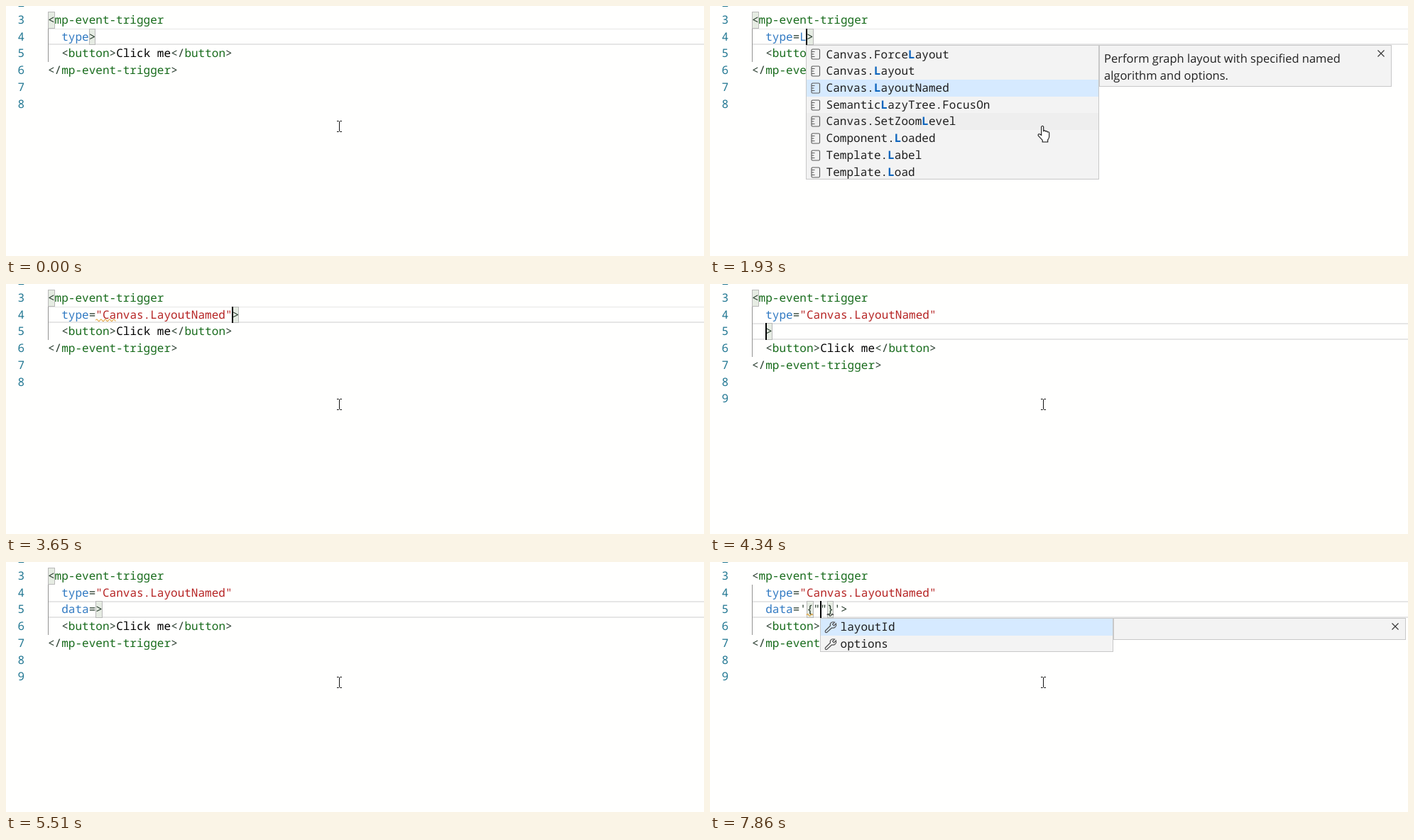
An HTML page with a canvas for the animation above (8000 ms loop, 983 by 353 pixels).

```html
<!DOCTYPE html>
<html lang="en">
<head>
<meta charset="utf-8">
<title>Editor completion</title>
<style>
  html, body { margin: 0; height: 100%; overflow: hidden; background: #fffffe; }
  canvas { display: block; }
</style>
</head>
<body>
<canvas width="983" height="353"></canvas>
<script>
const ctx = document.querySelector('canvas').getContext('2d');
const LOOP = 8000, LEFT = 59, TOP = 8, CELL = 9.62, ROW = 23.73, MENU_W = 413, HELP_W = 412;
const MONO = '16.03px "Noto Sans Mono", monospace';
const SANS = '16.5px "Open Sans", sans-serif';
const DARK = '#263a2b', GREEN = '#176b1b', BLUE = '#3079c2', RED = '#b52222', ORANGE = '#e0a23c';

const colX = col => LEFT + col * CELL;
const rowY = row => TOP + row * ROW;
const baseline = row => Math.round(rowY(row) + 16.95);

const layoutHelp = ['Perform graph layout with specified named', 'algorithm and options.'];
const layouts = ['Canvas.ForceLayout', 'Canvas.Layout', 'Canvas.LayoutNamed', 'SemanticLazyTree.FocusOn'];
const typeMenu = (query, items, selected = 2) =>
  ({ query, items, selected, icon: ruler, help: layoutHelp, helpH: 59 });
const dataMenu = query =>
  ({ query, items: ['data'], selected: 0, icon: field, help: ['Data that will be sent to all targets.'], helpH: 35 });

const allTypes = typeMenu('', [
  'Canvas.LayoutNamed', 'Canvas.Print', 'Canvas.SetZoomLevel', 'Canvas.ZoomBy', 'Canvas.ZoomIn',
  'Canvas.ZoomOut', 'Canvas.ZoomToFit', 'Component.Loaded', 'Component.Refresh',
  'Component.TemplateUpdate', 'Components.SetManagement.ItemAdded', 'Components.SetManagement.ItemRemov…'], 0);
const keyMenu = { query: '', items: ['layoutId', 'options'], selected: 0, icon: wrench, help: [], helpH: 31 };

// Each step overrides part of the state; "|" marks the caret.
const steps = [
  [0, { code: '  type|>', caret: false, menu: null, hand: false, waves: [], done: '', braces: false }],
  [460, { caret: true }],
  [930, { code: '  type=|>', menu: allTypes, hand: true }],
  [1390, { caret: false }],
  [1930, { code: '  type=L|>', caret: true, menu: typeMenu('L',
    [...layouts, 'Canvas.SetZoomLevel', 'Component.Loaded', 'Template.Label', 'Template.Load']) }],
  [2090, { code: '  type=La|>', menu: typeMenu('La', [...layouts, 'Template.Label']) }],
  [2300, { code: '  type=Lay|>', menu: typeMenu('Lay', layouts), hand: false }],
  [2850, { caret: false, waves: [[7, 3, ORANGE]] }],
  [3340, { caret: true }],
  [3650, { code: '  type="Canvas.LayoutNamed"|>', menu: null }],
  [4110, { caret: false }],
  [4190, { waves: [] }],
  [4340, { done: '  type="Canvas.LayoutNamed"', code: '  |>', caret: true }],
  [4650, { code: '  d|>' }],
  [4730, { menu: dataMenu('d') }],
  [4880, { code: '  da|>', menu: dataMenu('da') }],
  [4960, { code: '  dat|>', menu: dataMenu('dat') }],
  [5110, { code: '  data|>', menu: dataMenu('data') }],
  [5510, { code: '  data=|>', caret: false, menu: null }],
  [5910, { code: "  data='|'>", caret: true }],
  [6440, { caret: false, waves: [[7, 2, ORANGE]] }],
  [6670, { code: "  data='{|'>", caret: true }],
  [6920, { code: "  data='{|}'>", braces: true, waves: [] }],
  [7470, { caret: false, waves: [[8, 2, ORANGE]] }],
  [7620, { code: `  data='{"|"}'>`, caret: true, waves: [[8, 1, ORANGE], [11, 1, '#333']] }],
  [7710, { caret: false, menu: keyMenu }],
  [7860, { caret: true }],
];

function text(str, x, y, color, font = MONO) {
  ctx.font = font;
  ctx.fillStyle = color;
  ctx.fillText(str, x, y);
}

// Fills between whole pixels so that edges stay sharp.
function rect(x, y, w, h, fill, stroke) {
  const left = Math.round(x), top = Math.round(y);
  const width = Math.round(x + w) - left, height = Math.round(y + h) - top;
  ctx.fillStyle = fill;
  ctx.fillRect(left, top, width, height);
  if (!stroke) return;
  ctx.strokeStyle = stroke;
  ctx.lineWidth = 1;
  ctx.strokeRect(left + .5, top + .5, width - 1, height - 1);
}

function path(d, stroke, width = 1.2, fill) {
  const p = new Path2D(d);
  if (fill) { ctx.fillStyle = fill; ctx.fill(p); }
  ctx.strokeStyle = stroke;
  ctx.lineWidth = width;
  ctx.stroke(p);
}

function at(x, y, draw) {
  ctx.save();
  ctx.translate(x, y);
  draw();
  ctx.restore();
}

function ruler() {
  path('M3 -7H11.5Q13 -7 13 -5.5V5.5Q13 7 11.5 7H3Q1.5 7 1.5 5.5V-5.5Q1.5 -7 3 -7ZM2 -3.5H6M2 0H5M2 3.5H6', '#5a5a5a', 1.1);
}

function field() {
  path('M7.5 -2V-5.5H16.5V.5H12', '#bf6d13', 1.3);
  path('M.5 -.5H9.5V6.5H.5ZM3 2H7M3 4H7M10 -3H14', '#bf6d13', 1.3);
}

function wrench() {
  path('M1 5L8 -2C7 -6 10 -8 14 -7L11 -4L13 -2L16 -5C17 -1 14 2 10 1L3 7.5Q0 8 1 5Z', '#505050');
}

function drawCode(line, row) {
  let col = 0, previous = '';
  for (const token of line.match(/<\/?|>|"[^"]*"|'[^']*'|=|[^<>="']+/g) || []) {
    const color = /^[<>='{]/.test(token) ? DARK
      : token[0] === '"' ? RED
      : previous[0] === '<' ? GREEN
      : previous === '>' ? '#000' : BLUE;
    text(token, colX(col), baseline(row), color);
    col += token.length;
    previous = token;
  }
}

function bracketBox(col, row) {
  rect(colX(col), rowY(row), CELL, ROW, '#e6ece3', '#b9b9b9');
}

function wave(col, length, row, color) {
  const x = colX(col), y = rowY(row) + 19.5;
  let d = `M${x} ${y}`;
  for (let i = 1; i <= length * CELL; i++) d += `L${x + i} ${y - 1.5 * Math.sin(i * Math.PI / 3)}`;
  path(d, color, 1.1);
}

function drawMenu(menu, x, y, hover) {
  const right = x + MENU_W;
  if (menu.help) {
    rect(right, y, HELP_W, menu.helpH, '#f3f3f3', '#c8c8c8');
    menu.help.forEach((line, i) => text(line, right + 7, Math.round(y) + 25 + i * 23.5, '#222', SANS));
    at(right + HELP_W - 15, Math.round(y) + 12, () => path('M-4.5 -4.5L4.5 4.5M4.5 -4.5L-4.5 4.5', '#333', 1.1));
  }
  const height = menu.items.length * ROW;
  rect(x, y, MENU_W, height, '#f3f3f3', '#c8c8c8');
  menu.items.forEach((item, i) => {
    const top = y + 1 + i * ROW, rowH = Math.min(ROW, y + height - 1 - top);
    if (i === menu.selected) rect(x + 1, top, MENU_W - 2, rowH, '#d6eaff');
    else if (hover && i === 4) rect(x + 1, top, MENU_W - 2, rowH, '#eeeeee');
    at(x + 6.5, Math.round(top + 12), menu.icon);
    let matched = 0;
    [...item].forEach((ch, k) => {
      const hit = ch === menu.query[matched];
      if (hit) matched++;
      text(ch, x + 28.6 + k * CELL, Math.round(top + 17.1), hit ? '#0f66bd' : '#1e1e1e', (hit ? 'bold ' : '') + MONO);
    });
  });
}

function drawPointer(hand) {
  if (hand) {
    at(461.7, 168.5, () => path('M5 14V2Q6.5 -.5 8 2V8Q10 6.5 11 8.5Q13 7.5 13.5 9.5Q16 8.5 16 11V16Q15.5 19 14 20.5V23.5H6.5V21L.5 14.5Q0 11.5 3 12.5Z',
      '#111', 1.1, '#fff'));
  } else {
    path('M466 162.5H468.5L469.5 163.5L470.5 162.5H473M469.5 163V176.5M466 177.5H468.5L469.5 176.5L470.5 177.5H473', '#111', 1);
  }
}

function draw(time) {
  const state = Object.assign({}, ...steps.filter(([start]) => start <= time).map(step => step[1]));
  const row = state.done ? 2 : 1;
  const caretCol = state.code.indexOf('|');
  const code = state.code.replace('|', '');
  const lines = ['<mp-event-trigger', ...(state.done ? [state.done] : []), code,
    '  <button>Click me</button>', '</mp-event-trigger>', '', ''];

  rect(0, 0, 983, 353, '#fffffe');
  rect(LEFT, rowY(row), 924, 1.5, '#e6e6e6');
  rect(LEFT, rowY(row + 1) - 2, 924, 1.5, '#e6e6e6');
  rect(LEFT, rowY(1), 1, ROW * (row + 1), '#939393');

  if (state.braces) {
    bracketBox(code.indexOf('{'), row);
    bracketBox(code.indexOf('}'), row);
  } else {
    bracketBox(0, 0);
    bracketBox(code.length - 1, row);
  }

  for (let i = -1; i < lines.length; i++) text(i + 3, 16.6, baseline(i), '#237893');
  lines.forEach(drawCode);
  state.waves.forEach(([col, length, color]) => wave(col, length, row, color));
  const caretX = Math.floor(colX(caretCol));
  if (state.caret) rect(caretX, rowY(row), 2, ROW, '#000');
  if (state.menu) drawMenu(state.menu, caretX, rowY(row + 1), state.hand);
  drawPointer(state.hand);
}

ctx.textRendering = 'geometricPrecision';
const begin = performance.now();
function tick() {
  draw((performance.now() - begin) % LOOP);
  requestAnimationFrame(tick);
}
tick();
</script>
</body>
</html>
```
